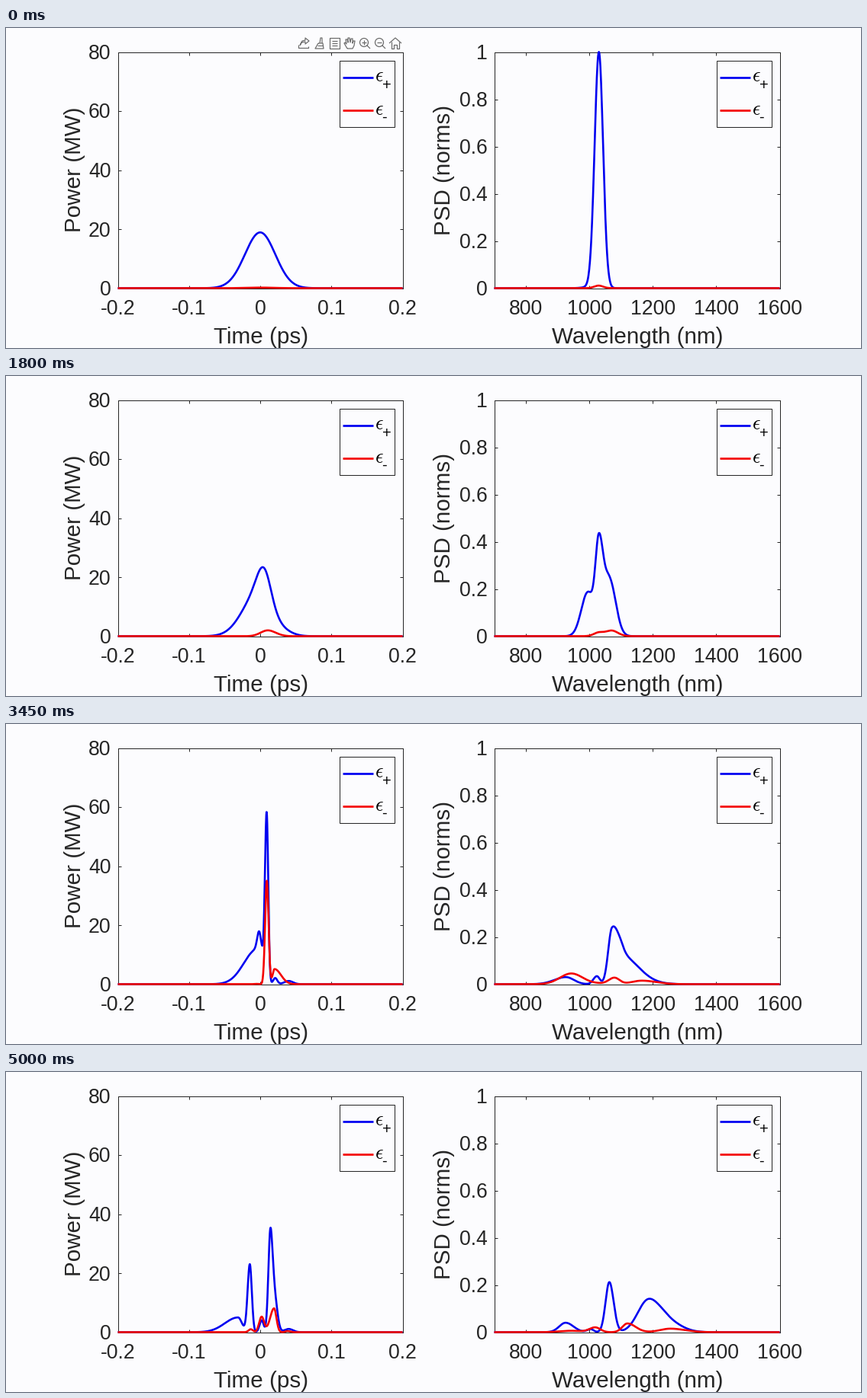
A matplotlib script for the animation above (5050 ms loop, 1120 by 420 pixels).

```python
import numpy as np
import matplotlib.pyplot as plt
from matplotlib.animation import FuncAnimation
from matplotlib.patches import Circle, Rectangle

FRAMES, STEP = 101, 50
W, H = 1120, 420
PX = 0.72  # points per pixel at 100 dpi
PAPER, INK, ICON = "#fcfcfe", "#262626", "#6a6a6a"
BLUE, RED = "#0000f0", "#f40000"
TOP, BOTTOM = 31.5, 341.5
FONT = "Liberation Sans"

# One row per frame, so every rule below broadcasts to frames x samples
t = np.arange(FRAMES)[:, None] * STEP / 1000


def ramp(start, end, a, b):
    """Smooth step in time from a to b."""
    s = np.clip((t - start) / (end - start), 0, 1)
    return a + (b - a) * s * s * (3 - 2 * s)


def bell(x, centre, left, right):
    """Unit peak with its own width on each side."""
    return np.exp(-0.5 * ((x - centre) / np.where(x < centre, left, right)) ** 2)


def swell(peak, rise, fall):
    return bell(t, peak, rise, fall)


def power_plus(x):
    """Pulse steepens, spikes, then breaks into two peaks (x in fs, result in MW)."""
    d = t - 3.45
    late = ramp(3.9, 4.8, 0, .6)
    pulse = (ramp(.8, 1.8, 18.9, 14) - ramp(2.8, 4.8, 0, 9)) * bell(
        x, -ramp(.6, 2, 0, 4) - ramp(3.3, 5.2, 0, 28),
        ramp(2, 3.4, 21.5, 18.5), ramp(1.8, 3.4, 21.2, 5.5))
    spike = (ramp(.6, 2.9, 0, 19.5) - ramp(3.8, 5, 0, 16)
             + 57 * swell(3.72, .295, .42)) * bell(
        x, ramp(2.7, 3.5, 5.5, 9.1) - ramp(4, 5.1, 0, 7.3),
        ramp(1.2, 3.6, 11.5, 2.3) + late, ramp(1, 3.4, 12, 2.2) + late)
    lead = (ramp(2.8, 3.6, 0, 9) + ramp(3.6, 5, 0, 14)) * bell(
        x, -.5 - 7.4 * d - 1.1 * d ** 2, 3.1, ramp(3.4, 4.3, 4.5, 2.8))
    trail = 38 * swell(4.75, .54, .49) * bell(x, 12 + 9 * np.exp(-d / 1.1), 2.8, 3)
    shoulder = ramp(4.4, 5.1, 0, 12.5) * bell(x, 20, 3, 4)
    tail_width = ramp(2.6, 3.4, 11, 6)
    tail = ramp(1.4, 2.7, 0, 1.1) * bell(x, 40, tail_width, tail_width)
    return pulse + spike + lead + trail + shoulder + tail


def power_minus(x):
    width = ramp(0, 3.2, 20, 2.4) + ramp(3.9, 4.8, 0, 1.1)
    main = (ramp(.8, 2, .2, 1.7) + ramp(4.4, 5, 0, 2.3)
            + 35.5 * swell(3.65, .57, .52)) * bell(
        x, ramp(0, 1.8, 0, 9.3) - ramp(4, 5.1, 0, 7.5), width, width)
    after = 5.5 * swell(3.15, .6, .8) * bell(
        x, 18 + 3.8 * (t - 2.7) ** 2, ramp(2, 3.4, 9, 2.7), ramp(3.5, 5, 9, 4))
    split = ramp(3.7, 5.1, 0, 8.2) * bell(
        x, ramp(4, 5.1, 13.6, 19.6), ramp(4.35, 5, 3, 5.5), 3.3)
    before = ramp(3.2, 4.4, 0, 1) * bell(x, 10.2 - 4.7 * t, 3, 3)
    return main + after + split + before


def psd_plus(x):
    """Pump line decays while lobes grow on both sides (x in nm)."""
    e = t - 2.7
    pump = (np.exp(-(t / 1.8) ** 2.8) * ramp(2.2, 2.7, 1, 0)
            + .045 * swell(3.9, .6, .7)) * bell(
        x, ramp(2.9, 4.6, 1030, 1004), ramp(.6, 1.8, 13.4, 11), ramp(2, 3.2, 13.2, 9))
    short = (.19 * swell(1.95, .7, .72) + ramp(2.8, 5, 0, .04)) * bell(
        x, ramp(2.75, 3.5, 995, 925), 20 + 16 * swell(3.4, .6, .5),
        ramp(1.8, 2.6, 18, 9) + ramp(2.8, 3.4, 0, 16))
    beside = (ramp(.2, 1.9, 0, .212) + .15 * swell(2.7, .5, .3)) * bell(
        x, 1063 + 8 * swell(3.45, .4, .4),
        ramp(2.7, 3.3, 17.5, 12), ramp(3.4, 4.3, 20, 13.5))
    flank = (ramp(1.9, 3.3, 0, .115) + ramp(4.2, 5, 0, .02)) * bell(
        x, 1095 + 11.8 * e + 5.2 * e ** 3,
        ramp(2.7, 3.4, 15, 19) + ramp(4.2, 5, 0, 14),
        25 + 24 * swell(3.45, .35, .4) + ramp(4.3, 5, 0, 11))
    far = .078 * swell(4.4, .4, .55) * bell(x, ramp(4, 5.1, 1190, 1247), 30, 43)
    return pump + short + beside + flank + far


def psd_minus(x):
    width = ramp(1.7, 3.4, 14, 36)
    left = (ramp(0, .8, .011, .006) + .046 * swell(3.2, .7, .45)) * bell(
        x, ramp(1.7, 3.5, 1029, 943), width, width)
    early = .024 * swell(1.9, .6, .3) * bell(x, 1070, 20, 20)
    middle = .052 * swell(2.7, .35, .3) * bell(x, 1028, 22, 23)
    moving = (ramp(3, 3.5, 0, .028) - ramp(4.4, 5, 0, .008)) * bell(
        x, ramp(3.4, 5.1, 1079, 1018), 18, 16)
    right = ramp(3.7, 4.5, 0, .037) * bell(x, 1120, 16, 26)
    far = ramp(2, 2.8, 0, .015) * bell(
        x, 1122 + 58 * (t - 2.7), ramp(2.7, 3.4, 21, 32), ramp(2.7, 3.4, 22, 45))
    return left + early + middle + moving + right + far


fig = plt.figure(figsize=(11.2, 4.2), dpi=100, facecolor=PAPER)
ax = fig.add_axes([0, 0, 1, 1])
ax.set_xlim(0, W)
ax.set_ylim(H, 0)
ax.axis("off")


def stroke(xs, ys, color=INK, width=1.0, z=2):
    line, = ax.plot(xs, ys, color=color, lw=width * PX, zorder=z,
                    solid_capstyle="butt", solid_joinstyle="round")
    return line


def label(x, y, text, size=26.67, ha="center", **kw):
    kw.setdefault("color", INK)
    ax.text(x, y, text, size=size * PX, ha=ha, va="baseline", family=FONT,
            rotation_mode="anchor", **kw)


def frame_box(x0, y0, x1, y1, z=2):
    ax.add_patch(Rectangle((x0, y0), x1 - x0, y1 - y0, fc=PAPER, ec=INK,
                           lw=PX, zorder=z))


def legend(x):
    frame_box(x, 42.5, x + 72, 129.5, z=6)
    for y, color, sign, drop in ((64.5, BLUE, "+", 16.5), (107.5, RED, "-", 15.5)):
        stroke([x + 4.5, x + 44.5], [y, y], color, 2.7, 7)
        label(x + 46.5, y + 6, r"$\epsilon$", 26, "left", color="black",
              math_fontfamily="cm", zorder=7)
        label(x + 56, y + drop, sign, 20, "left", color="black", zorder=7)


def panel(x0, x1, lo, hi, top, xticks, yticks, xname, yname, yname_x):
    """Draw one chart and return functions from data to pixels."""
    def to_x(v):
        return x0 + (v - lo) / (hi - lo) * (x1 - x0)

    def to_y(v):
        return BOTTOM - v / top * (BOTTOM - TOP)

    frame_box(x0, TOP, x1, BOTTOM, z=1)
    for v in xticks:
        x = to_x(v)
        stroke([x, x], [BOTTOM, BOTTOM - 4])
        stroke([x, x], [TOP, TOP + 4])
        label(x, 376.5, f"{v:g}")
    for v in yticks:
        y = to_y(v)
        stroke([x0, x0 + 4], [y, y])
        stroke([x1, x1 - 4], [y, y])
        label(x0 - 9, y + 9.5, f"{v:g}", ha="right")
    label((x0 + x1) / 2 + 1, 413.5, xname, 29.6)
    label(yname_x, 186, yname, 29.6, rotation=90)
    return to_x, to_y


time_x, power_y = panel(146.5, 519.5, -200, 200, 80, (), range(0, 81, 20),
                        "Time (ps)", "Power (MW)", 98)
for v in (-.2, -.1, 0, .1, .2):
    x = time_x(v * 1000)
    stroke([x, x], [BOTTOM, BOTTOM - 4])
    stroke([x, x], [TOP, TOP + 4])
    label(x, 376.5, f"{v:g}")
wave_x, psd_y = panel(639.5, 1013.5, 700, 1600, 1, range(800, 1601, 200),
                      (0, .2, .4, .6, .8, 1), "Wavelength (nm)", "PSD (norms)", 582)
legend(436.5)
legend(930.5)

fs = np.linspace(-200, 200, 1200)
nm = np.linspace(700, 1600, 1200)
curves = []
for to_x, to_y, xs, rule, color in (
        (time_x, power_y, fs, power_plus, BLUE), (time_x, power_y, fs, power_minus, RED),
        (wave_x, psd_y, nm, psd_plus, BLUE), (wave_x, psd_y, nm, psd_minus, RED)):
    ys = to_y(rule(xs))
    curves.append((stroke(to_x(xs), ys[0], color, 2.6, 4 + (color == RED)), ys))

# Toolbar shown only at the start
toolbar = []


def icon(x, *paths):
    for path in paths:
        px, py = np.array(path).T
        toolbar.append(stroke(x + px, 20 + py, ICON, 1.2))


def lens(x, *marks):
    icon(x, [(2.5, 2.5), (7, 7)], [(-4, -1), (2, -1)], *marks)
    ring = Circle((x - 1, 19), 5.5, fc="none", ec=ICON, lw=1.2 * PX, zorder=2)
    toolbar.append(ax.add_patch(ring))


icon(390, [(-7, 2), (-7, 6), (6, 6), (6, 4)],
     [(-5, 3), (-3, -1), (2, -2), (2, 1), (7, -3), (2, -7), (2, -4), (-2, -3), (-5, 3)])
icon(411, [(0, 0), (1, -7), (3, -7), (3, 0)],
     [(-2, 0), (4, 0), (5, 7), (-6, 7), (-2, 0)], [(-3, 3), (4, 3)])
icon(430, [(-6, -7), (7, -7), (7, 7), (-6, 7), (-6, -7)],
     *([(-3, y), (4, y)] for y in (-3, 0, 3)))
icon(450, [(-3, 7), (-7, 0), (-6, -1), (-4, 1), (-5, -5), (-3, -5), (-2, -1),
           (-2, -7), (0, -7), (1, -1), (2, -6), (4, -6), (4, 0), (5, -3),
           (7, -3), (6, 3), (4, 7), (-3, 7)])
lens(470, [(-1, -4), (-1, 2)])
lens(490)
icon(510, [(-8, 0), (0, -7), (8, 0)],
     [(-5, -2), (-5, 7), (-2, 7), (-2, 2), (2, 2), (2, 7), (5, 7), (5, -2)])


def draw(i):
    for line, ys in curves:
        line.set_ydata(ys[i])
    for part in toolbar:
        part.set_visible(i == 0)
    return [line for line, _ in curves] + toolbar


def reset():
    return draw(0)


anim = FuncAnimation(fig, draw, frames=FRAMES, init_func=reset,
                     interval=STEP, repeat=True, repeat_delay=0)
plt.show()
```
